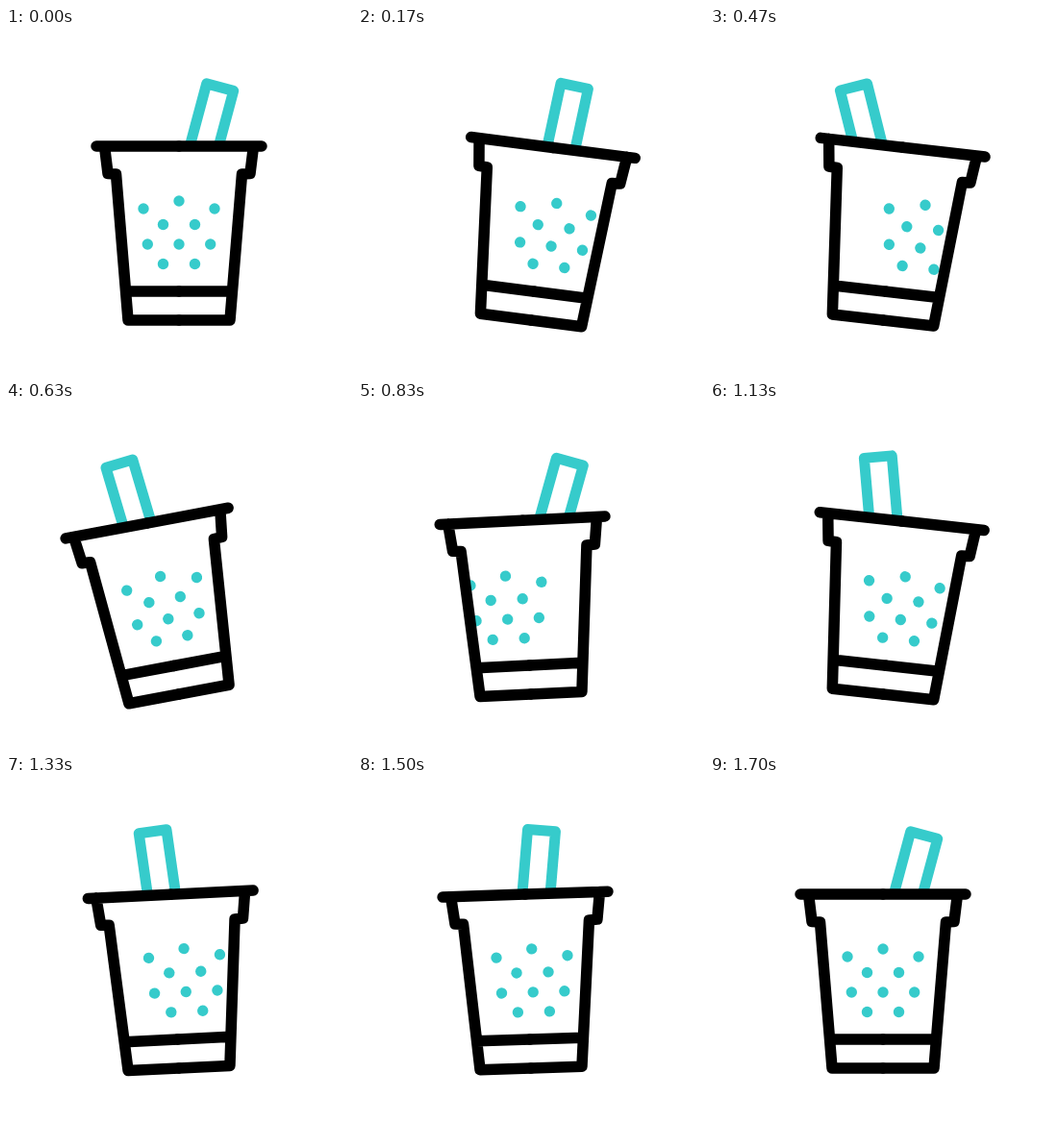
Write an HTML page that moves like this. It is 360 px wide and 360 px high and loops after 2 s.

```html
<!DOCTYPE html>
<html lang="en">
<head>
<meta charset="utf-8">
<title>Swaying drink</title>
<style>
  html, body { margin: 0; width: 100%; height: 100%; overflow: hidden; background: #fff; }
  svg { display: block; width: 100vw; height: 100vh; }
  path { fill: none; stroke: #000; stroke-width: 11.5; stroke-linecap: round; stroke-linejoin: round; }
  #straw { stroke: #36cbcb; stroke-width: 11; }
  #dots { fill: #36cbcb; }
</style>
</head>
<body>
<svg viewBox="0 0 360 360">
  <defs>
    <clipPath id="above"><rect y="-40" width="360" height="163"/></clipPath>
    <clipPath id="inside"><path d="M102 123L115 152L127 304H233L245 152L258 123Z"/></clipPath>
    <path id="side" d="M180 123H266M257.500 123L254 151.500L245.500 152L233 304H180M235 274H180"/>
  </defs>
  <g id="cup">
    <g clip-path="url(#above)"><path id="straw" d="M165.500 190V56H194.500V190"/></g>
    <g clip-path="url(#inside)"><g id="dots"></g></g>
    <use href="#side"/>
    <use href="#side" transform="translate(360) scale(-1 1)"/>
  </g>
</svg>
<script>
const LOOP = 2000, STEP = 100 / 3, END = 51;
const $ = id => document.getElementById(id);

// Swings through the values with eased beats, each shorter than the last by `shrink`;
// the final beat runs on to the end.
function swing(x, beat, shrink, values) {
  let i = 0, from = 0;
  while (i < values.length - 2 && x > from + beat) {
    from += beat;
    beat -= shrink;
    i++;
  }
  const length = i === values.length - 2 ? END - from : beat;
  const u = (x - from) / length;
  return values[i] + (values[i + 1] - values[i]) * u * u * (3 - 2 * u);
}

// Right half of the bubbles, mirrored: [distance from the middle, y]
const bubbles = [[0, 180], [37, 188], [16.5, 204.5], [0, 225], [32.7, 225], [16.5, 245.5]];
for (const [d, y] of bubbles)
  for (const x of new Set([180 - d, 180 + d]))
    $('dots').innerHTML += `<circle cx="${x}" cy="${y}" r="5.7"/>`;

function draw(time) {
  const x = Math.min(END, Math.floor((time % LOOP + 4) / STEP));
  const tilt = swing(x, 10.2, 0, [0, 15, -12, 9.5, -3, 0]);
  const lean = swing(x, 14.2, 2.6, [15, -20.6, 19, -11.9, 15]);
  const slosh = swing(x, 12.6, 0.5, [0, 32, -20.5, 13.2, 0]);
  $('cup').setAttribute('transform', `rotate(${tilt} 180 304)`);
  $('straw').setAttribute('transform', `rotate(${lean} 180 221)`);
  $('dots').setAttribute('transform', `translate(${slosh} 0)`);
}

const start = performance.now();
function tick() {
  draw(performance.now() - start);
  requestAnimationFrame(tick);
}
tick();
</script>
</body>
</html>
```
